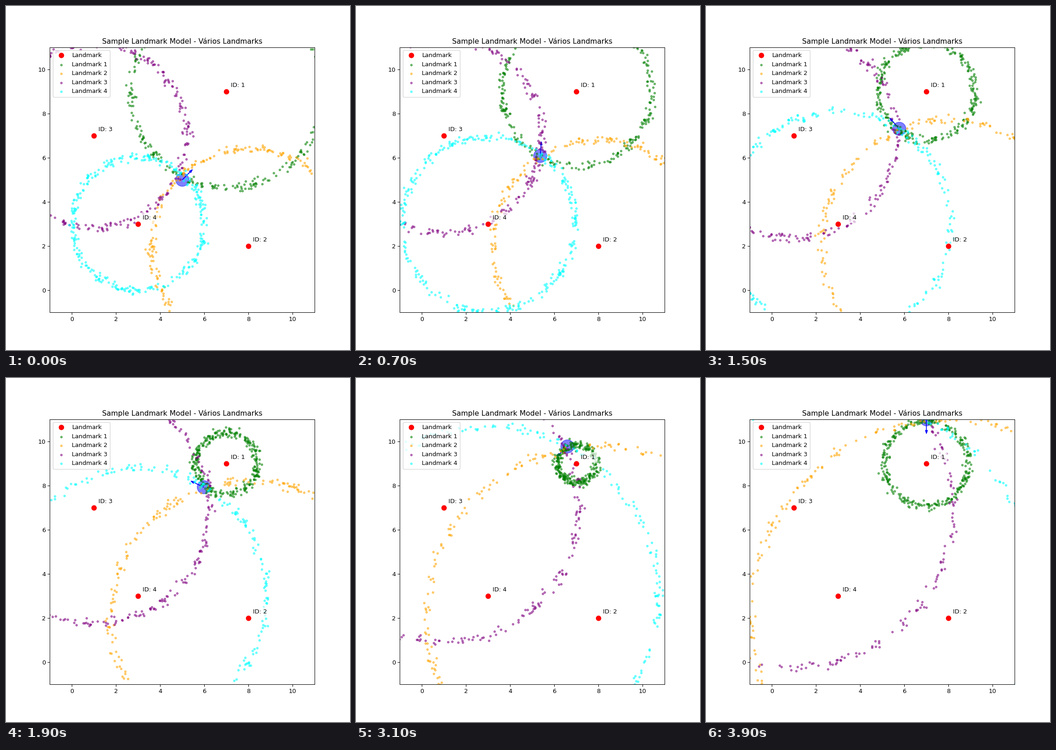
A matplotlib script for the animation above (4 s loop, 748 by 748 pixels).

```python
import numpy as np
import matplotlib.pyplot as plt
from matplotlib.animation import FuncAnimation
from matplotlib.patches import Circle

FRAMES = 40
INTERVAL = 100
SAMPLES = 300
SENSOR_NOISE = 0.1
RING_NOISE = 0.1
ARROW = 0.5

LANDMARKS = np.array([(7, 9), (8, 2), (1, 7), (3, 3)], float)
COLORS = ["green", "orange", "purple", "cyan"]

# x, y and heading of the robot
START = np.array([5, 5, np.pi / 4])
END = np.array([7, 11, 3 * np.pi / 2])


def pose(step):
    return START + (END - START) * step / (FRAMES - 1)


def sample_ring(center, distance, rng):
    """Positions from which a landmark would be seen at this distance."""
    angle = rng.uniform(0, 2 * np.pi, SAMPLES)
    radius = distance + rng.normal(0, RING_NOISE, SAMPLES)
    return center + np.column_stack((radius * np.cos(angle), radius * np.sin(angle)))


fig, ax = plt.subplots(figsize=(8, 8), dpi=93.5)
ax.set_xlim(-1, 11)
ax.set_ylim(-1, 11)
ax.set_aspect("equal")
ax.set_title("Sample Landmark Model - Vários Landmarks")

for k, (x, y) in enumerate(LANDMARKS):
    ax.plot(x, y, "ro", markersize=8, label="Landmark" if k == 0 else None)
    ax.text(x + 0.2, y + 0.2, f"ID: {k + 1}",
            bbox=dict(facecolor="white", alpha=0.7, edgecolor="none"))

robot = ax.add_patch(Circle(START[:2], 0.3, color="blue", alpha=0.5))
heading = ax.arrow(*START[:2], ARROW, 0, head_width=0.1, fc="blue", ec="blue")
rings = [
    ax.scatter([], [], s=10, color=color, alpha=0.5, label=f"Landmark {k + 1}")
    for k, color in enumerate(COLORS)
]
ax.legend(loc="upper left")


def update(step):
    rng = np.random.default_rng(100 + step)
    x, y, theta = pose(step)
    robot.center = x, y
    heading.set_data(x=x, y=y, dx=ARROW * np.cos(theta), dy=ARROW * np.sin(theta))

    for ring, center in zip(rings, LANDMARKS):
        distance = np.hypot(*(center - (x, y))) + rng.normal(0, SENSOR_NOISE)
        ring.set_offsets(sample_ring(center, distance, rng))
    return [robot, heading, *rings]


anim = FuncAnimation(fig, update, frames=FRAMES, interval=INTERVAL,
                     repeat=True, repeat_delay=0)
plt.show()
```
